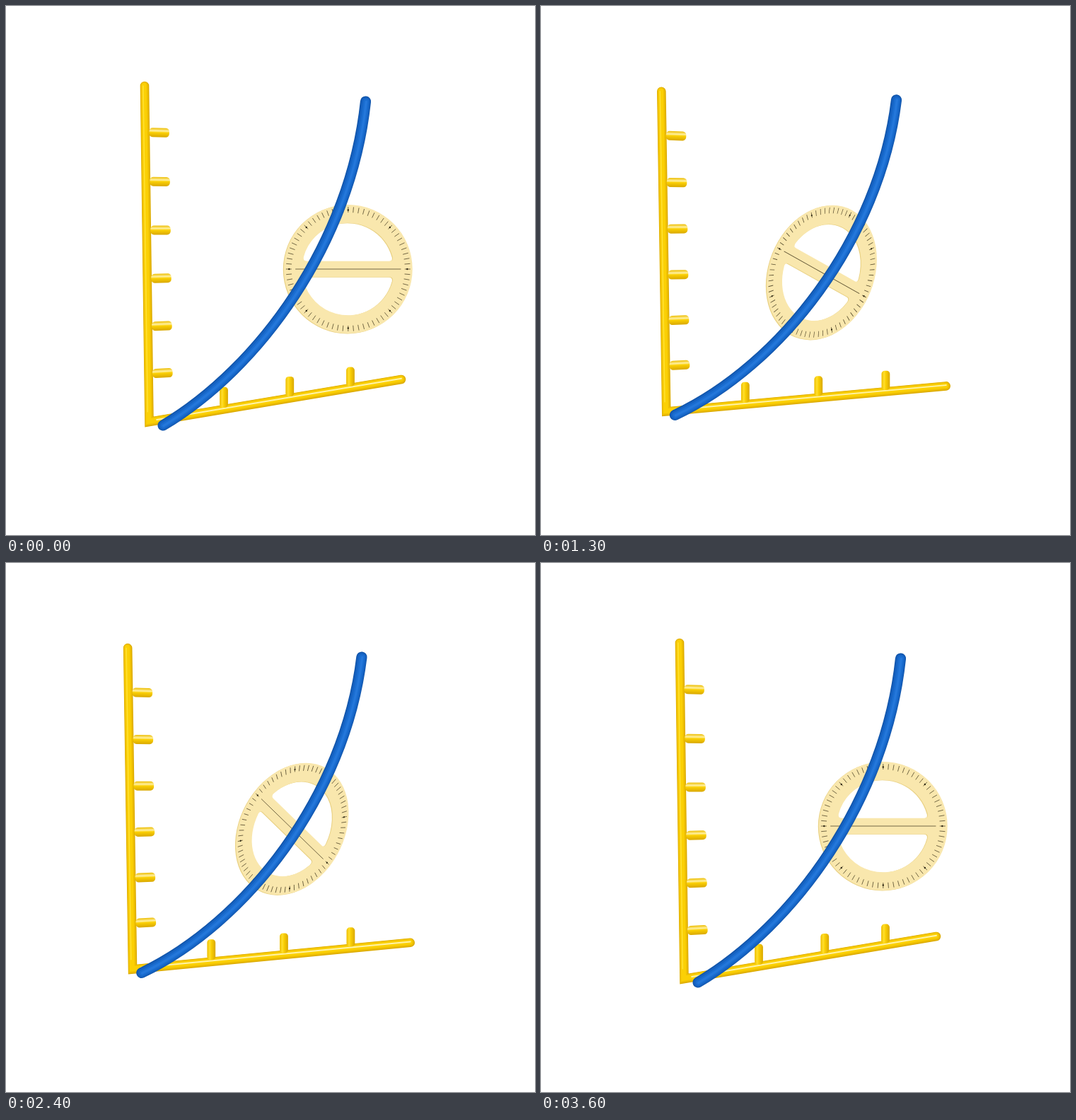
Animation of 748x748 px, one loop 3700 ms. Source, as an HTML page with a canvas:

```html
<!DOCTYPE html>
<html lang="en">
<head>
<meta charset="utf-8">
<title>Graph and protractor</title>
<style>
html, body { margin: 0; width: 100%; height: 100%; overflow: hidden; background: #fff; }
canvas { display: block; width: 748px; height: 748px; }
</style>
</head>
<body>
<canvas id="stage" width="748" height="748"></canvas>
<script>
const ctx = document.getElementById('stage').getContext('2d');
const LOOP = 3700, HALF = 1800, STEP = 100;
const TAU = 2 * Math.PI, DEG = Math.PI / 180;
const INK = '#5a4f30';

const mix = (a, b, u) => a + (b - a) * u;
const mixPt = (p, q, u) => [mix(p[0], q[0], u), mix(p[1], q[1], u)];

// Easing of the whole graph, slightly ahead of a sine
function swingEase(x) {
  const e = (1 - Math.cos(Math.PI * x)) / 2;
  return e + 0.24 * e * (1 - e);
}

function easeInOut(x, power = 2.1) {
  return x < 0.5 ? (2 * x) ** power / 2 : 1 - (2 - 2 * x) ** power / 2;
}

function stroke(path, width, color, dx = 0, dy = 0, cap = 'round') {
  ctx.save();
  ctx.translate(dx, dy);
  ctx.beginPath();
  path();
  ctx.lineWidth = width;
  ctx.strokeStyle = color;
  ctx.lineCap = cap;
  ctx.stroke();
  ctx.restore();
}

const line = (...pts) => () =>
  pts.forEach((p, i) => i ? ctx.lineTo(...p) : ctx.moveTo(...p));

// Short rod with softly rounded ends, lit on one side
function rod(from, to, width, shine) {
  const dx = to[0] - from[0], dy = to[1] - from[1], r = width / 2;
  const shade = ctx.createLinearGradient(0, -r, 0, r);
  shade.addColorStop(0, '#edbd00');
  shade.addColorStop(0.32, shine);
  shade.addColorStop(0.5, '#fbd005');
  shade.addColorStop(1, '#d9a800');
  ctx.save();
  ctx.translate(...from);
  ctx.rotate(Math.atan2(dy, dx));
  ctx.beginPath();
  ctx.roundRect(0, -r, Math.hypot(dx, dy), width, r * 0.75);
  ctx.fillStyle = shade;
  ctx.fill();
  ctx.restore();
}

function hole(sign) {
  const r = 66, y = 11.5 * sign, x = Math.sqrt(r * r - y * y);
  const a = Math.atan2(Math.abs(y) + 6, x - 1.2);
  ctx.moveTo(0, y);
  ctx.lineTo(x - 6, y);
  ctx.quadraticCurveTo(x, y, x - 1.2, y + 6 * sign);
  ctx.arc(0, 0, r, a * sign, (Math.PI - a) * sign, sign < 0);
  ctx.quadraticCurveTo(-x, y, 6 - x, y);
  ctx.closePath();
}

function plate(color) {
  ctx.beginPath();
  ctx.arc(0, 0, 92, 0, TAU);
  ctx.closePath();
  hole(-1);
  hole(1);
  ctx.fillStyle = color;
  ctx.fill('evenodd');
}

// The protractor slides left, makes half a turn and tips away on a turning axis
function drawProtractor(x) {
  const v = easeInOut(x), wobble = Math.sin(Math.PI * v);
  const tip = 9.5 * v + 7 * wobble;
  const axis = (45 + 43 * v ** 4) * DEG;
  const spin = (180 * v - 3 * wobble) * DEG;
  const pose = (dx, dy) => {
    ctx.setTransform(1, 0, 0, 1,
      483.5 - 104 * v + 4.5 * wobble + dx, 372 + 6.5 * v - 1.7 * wobble + dy);
    ctx.rotate(-axis);
    ctx.scale((85 + 0.6 * tip) / 86, (85 - 1.4 * tip) / 86);
    ctx.rotate(axis - spin);
  };
  ctx.save();
  pose(-0.8, 0.5);
  plate('#e9d183');
  pose(0.3, 0);
  plate('#f9e7ad');

  for (let i = 0; i < 72; i++) {
    const c = Math.cos(i * TAU / 72), s = Math.sin(i * TAU / 72);
    stroke(line([c * 81, s * 81], [c * 89, s * 89]), 0.85, INK, 0, 0, 'butt');
    if (i % 9 === 0) {
      ctx.beginPath();
      ctx.arc(c * 84.5, s * 84.5, 1.2, 0, TAU);
      ctx.fillStyle = '#2c2512';
      ctx.fill();
    }
  }
  stroke(line([-75.5, 0], [75.5, 0]), 0.85, INK, 0, 0, 'butt');
  ctx.restore();
}

function drawAxes(u) {
  const top = mixPt([196, 113], [166, 122], u);
  const corner = mixPt([202.5, 588], [173, 571], u);
  const right = mixPt([559, 528], [575, 539], u);
  const frame = line(top, corner, right);
  ctx.lineJoin = 'miter';
  stroke(frame, 12.6, '#dcab00');
  stroke(frame, 10.6, '#efc000', -0.4, -0.4);
  stroke(frame, 7, '#fbd005', -0.7, -0.7);
  stroke(line(mixPt(corner, right, 0.03), right), 2, '#fff3a8', 0, -1.3);
  stroke(line(top, mixPt(top, corner, 0.97)), 1.5, '#ffe133', -2, 0);

  for (let i = 0; i < 6; i++) {
    const s = i / 5;
    const [x, y] = mixPt(top, corner, 0.138 + 0.7185 * s + 0.017 * s * (1 - s));
    rod([x + 5.5, y], [x + 34, y + mix(0.9, -1.6, s)], 13, '#fff0a0');
  }
  for (let i = 0; i < 3; i++) {
    const [x, y] = mixPt(corner, right, 0.296 - 0.016 * u + 0.272 * i - 0.0105 * i * i);
    rod([x, y - 2.5], [x, y - 31.5 + i], 11.8, '#ffdf2e');
  }
}

function drawCurve(u) {
  const path = () => {
    ctx.moveTo(...mixPt([222, 593], [184, 576], u));
    ctx.bezierCurveTo(
      ...mixPt([358, 512], [336, 507], u),
      ...mixPt([487, 335.5], [477, 328], u),
      ...mixPt([508.5, 135], [501.5, 132.5], u));
  };
  stroke(path, 15.2, '#1155ab');
  stroke(path, 12.6, '#1562c2', 0.3, 0.2);
  stroke(path, 8, '#1a6dd0', 0.6, 0.3);
  stroke(path, 3.5, '#2477da', 0.8, 0.4);
}

function draw(now) {
  const t = Math.floor(now % LOOP / STEP) * STEP;
  const x = 1 - Math.abs(1 - t / HALF);
  const u = swingEase(x);
  ctx.fillStyle = '#fff';
  ctx.fillRect(0, 0, 748, 748);
  drawProtractor(x);
  drawAxes(u);
  drawCurve(u);
}

function tick() {
  draw(performance.now());
  requestAnimationFrame(tick);
}
tick();
</script>
</body>
</html>
```
